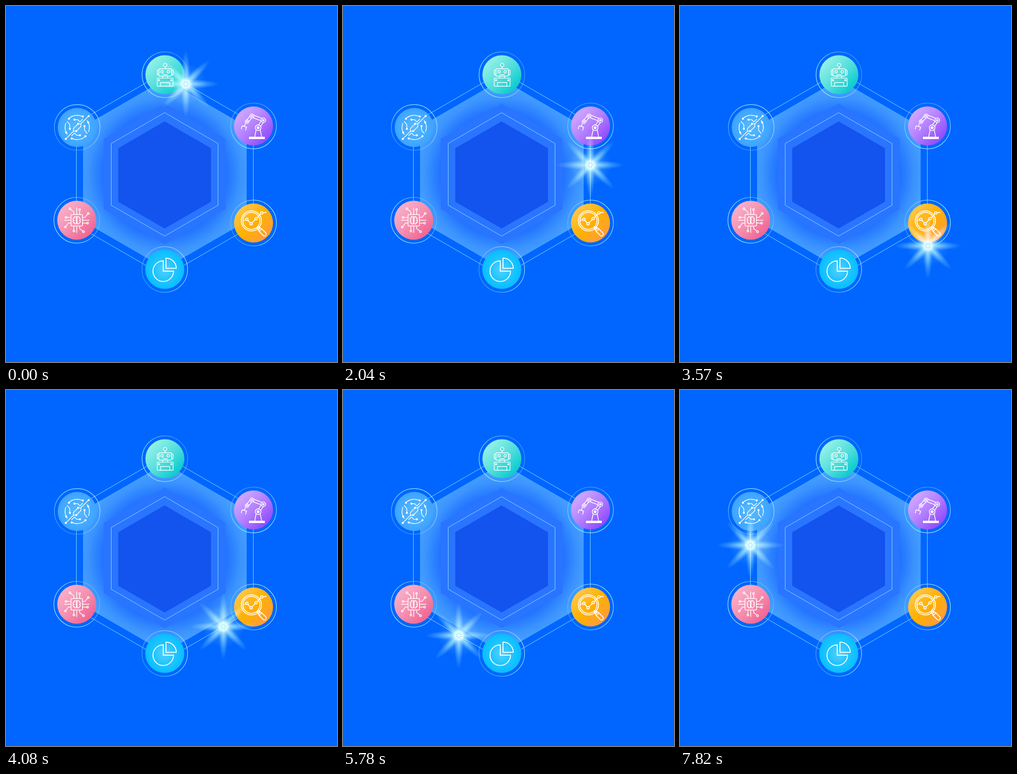
An HTML page with a canvas for the animation above (7990 ms loop, 722 px wide and 776 px high).

```html
<!DOCTYPE html>
<html lang="en">
<head>
<meta charset="utf-8">
<title>Orbiting spark</title>
<style>
html, body { margin: 0; width: 100%; height: 100%; overflow: hidden; background: #0066ff; }
canvas { display: block; }
</style>
</head>
<body>
<canvas id="stage" width="722" height="776"></canvas>
<script>
const W = 722, H = 776, STEP = 170, LOOP = 7990;
const TAU = Math.PI * 2, RAD = Math.PI / 180;
const DISC = 42.5, RING = 49.8;
const view = document.getElementById('stage').getContext('2d');
const scene = document.createElement('canvas');
scene.width = W;
scene.height = H;
const c = scene.getContext('2d');

// Clockwise from the top; the spark reaches a ring at step "enter" and quits it at "leave".
const badges = [
  { x: 346.6, y: 149.8, leave: 0, icon: robot, pen: 1.4, tilt: 160, colors: ['#96f1e8', '#55dfdd', '#08cace'] },
  { x: 540, y: 261.5, enter: 4.05, leave: 10.8, icon: robotArm, pen: 1.6, tilt: 70, colors: ['#cfa9ff', '#b27fff', '#8f4aff'] },
  { x: 540, y: 473, enter: 14.6, leave: 23, icon: magnifier, pen: 1.8, tilt: -20, colors: ['#ffc648', '#ffb000', '#ff9d3c'] },
  { x: 346.3, y: 574.3, enter: 27.2, leave: 32.5, icon: pie, pen: 2, tilt: -30, radial: true, colors: ['#56d2ff', '#25c5ff', '#06bfff'] },
  { x: 154.3, y: 467, enter: 36, leave: 43, icon: chip, pen: 1.5, tilt: 150, colors: ['#f9afc9', '#f58fb0', '#ee6593'] },
  { x: 155.3, y: 264.7, enter: 46.9, icon: circuitGlobe, pen: 1.5, tilt: -60, radial: true, colors: ['#58baff', '#4aafff', '#3ea3ff'] }
];

const polar = (x, y, r, a) => [x + r * Math.cos(a), y + r * Math.sin(a)];
const corner = i => polar(346.5, 366.5, 222.8, (i * 60 - 90) * RAD);

// Where the hexagon edge leaving corner i at angle a crosses the ring of badge i.
function crossing(i, a) {
  const b = badges[i], [x, y] = corner(i);
  const wx = x - b.x, wy = y - b.y;
  const along = wx * Math.cos(a) + wy * Math.sin(a);
  return polar(x, y, Math.sqrt(along * along - wx * wx - wy * wy + RING * RING) - along, a);
}
const entry = i => crossing(i, (i * 60 + 150) * RAD);
const exit = i => crossing(i, (i * 60 + 30) * RAD);

function sparkAt(step) {
  const i = badges.findIndex(b => step < (b.leave ?? Infinity));
  const b = badges[i], prev = badges[i - 1];
  const [x1, y1] = entry(i);
  if (step < b.enter) {
    const [x0, y0] = exit(i - 1);
    const k = (step - prev.leave) / (b.enter - prev.leave);
    return [x0 + (x1 - x0) * k, y0 + (y1 - y0) * k];
  }
  const [x2, y2] = exit(i);
  const from = Math.atan2(y1 - b.y, x1 - b.x);
  const sweep = (Math.atan2(y2 - b.y, x2 - b.x) - from + 2 * TAU) % TAU;
  return polar(b.x, b.y, RING, from + sweep * (step - b.enter) / (b.leave - b.enter));
}

function poly(...points) {
  c.beginPath();
  for (let i = 0; i < points.length; i += 2) c.lineTo(points[i], points[i + 1]);
  c.stroke();
}

function ring(x, y, r, a0 = 0, a1 = 360) {
  c.beginPath();
  c.arc(x, y, r, a0 * RAD, a1 * RAD);
  c.stroke();
}

function dot(x, y, r) {
  c.beginPath();
  c.arc(x, y, r, 0, TAU);
  c.fill();
}

function box(x, y, w, h, r) {
  c.beginPath();
  c.roundRect(x, y, w, h, r);
  c.stroke();
}

function hexagon(x, y, r) {
  c.beginPath();
  for (let i = 0; i < 6; i++) c.lineTo(...polar(x, y, r, (i * 60 - 90) * RAD));
  c.closePath();
}

function blend(gradient, colors) {
  colors.forEach((color, i) => gradient.addColorStop(i / (colors.length - 1), color));
  return gradient;
}

// Draws the same part several times, turned about the icon's middle.
function turned(count, draw) {
  for (let i = 0; i < count; i++) {
    draw();
    c.rotate(TAU / count);
  }
}

function mirrored(draw) {
  for (const side of [1, -1]) {
    c.save();
    c.scale(side, 1);
    draw();
    c.restore();
  }
}

// Round joints joined by bars; a bar is two strokes when gap is above zero.
function chain(joints, gap) {
  joints.forEach(([x, y, r], i) => {
    ring(x, y, r);
    if (!i) return;
    const [px, py, pr] = joints[i - 1];
    const a = Math.atan2(y - py, x - px);
    for (const g of gap ? [-gap, gap] : [0]) {
      const start = Math.sqrt(pr * pr - g * g);
      const end = Math.hypot(x - px, y - py) - Math.sqrt(r * r - g * g);
      const [ox, oy] = polar(px, py, g, a + TAU / 4);
      poly(...polar(ox, oy, start, a), ...polar(ox, oy, end, a));
    }
  });
}

function robot() {
  ring(.5, -21, 3.9);
  c.translate(.6, 0);
  poly(0, -17, 0, -13);
  poly(-5, 0, 5, 0);
  box(-13.7, -13, 27.4, 16, 2);
  box(-17.3, 7.3, 34.6, 17.7, 1);
  poly(-10, 25, -10, 17, 10, 17, 10, 25);
  mirrored(() => {
    box(13.7, -10, 3.6, 10.5, 1);
    ring(6.8, -6.5, 2.8);
    poly(5.2, 3, 5.2, 7.3);
    ring(13.4, 12, 1.5);
  });
}

function robotArm() {
  const joints = [[-14.5, -9.2, 3.9], [-3.5, -22, 4.2], [21.3, -12.5, 5], [10, 3.8, 6.2]];
  chain(joints, 2.8);
  for (const [x, y, r] of joints) dot(x, y, r * .5);
  c.fillRect(-10, 23.5, 34.5, 5);
  poly(5.5, 8.5, 2.5, 23.5);
  poly(14.5, 8.5, 17.5, 23.5);
  c.translate(-20, 1);
  c.rotate(17 * RAD);
  poly(0, -6, 0, 0);
  poly(-5, 7, -5, 0, 5, 0, 5, 7);
}

function magnifier() {
  ring(-4.7, -4.7, 22);
  ring(-4.7, -4.7, 18.5);
  chain([[-14.5, -8, 2.7], [-5.5, 1.7, 2.7], [5.5, -9.5, 2.7], [18, -22, 2.7]], 0);
  poly(-23, -5, -17, -7.3);
  poly(21, -22.2, 27.5, -23.5);
  c.translate(9.5, 10);
  c.rotate(45 * RAD);
  box(0, -3, 4, 6, 0);
  box(4, -4, 20, 8, 3.5);
  poly(8, -4, 8, 4);
}

function quadrant(x, y, a0, a1) {
  c.beginPath();
  c.moveTo(x, y);
  c.arc(x, y, 22.4, a0 * RAD, a1 * RAD);
  c.closePath();
  c.stroke();
}

function pie() {
  quadrant(-3.3, 3.7, 0, 270);
  quadrant(2.7, -2.5, -90, 0);
}

function chip() {
  box(-12.5, -12.5, 25, 25, 2);
  turned(4, () => {
    poly(0, -13, 0, -27);
    poly(6.2, -13, 6.2, -21.5);
    ring(6.2, -23.5, 1.9);
    poly(-6.2, -13, -6.2, -18, -13.3, -23.7);
    ring(-14.8, -25, 1.9);
  });
  mirrored(() => {
    poly(.7, -6, .7, 6);
    ring(3, -5.5, 2.5, 180, 370);
    ring(5.3, -2, 2.7, -80, 80);
    ring(5.3, 2.8, 2.7, -80, 95);
    ring(3, 5.7, 2.5, -10, 180);
  });
}

function circuitGlobe() {
  turned(2, () => {
    ring(0, 0, 26.5, -35, 20);
    ring(0, 0, 26.5, 50, 112);
    poly(-25, 25, -8, 8, -8, 2, 2, -8, 8, -8);
    poly(-6, -17, 1, -17, 6, -12, 12, -18);
    poly(-16, 3, -16, -6, -22, -13);
    for (const [x, y] of [[-25, 25], [-6, -17], [-16, 3], [-24, 11], [2, -8], [12, -24], [-18, -19]]) dot(x, y, 2.2);
  });
}

function drawBadge({ x, y, tilt, colors, radial, icon, pen }) {
  const start = polar(x, y, RING, tilt * RAD), end = polar(x, y, -RING, tilt * RAD);
  c.lineWidth = 1.2;
  c.strokeStyle = blend(c.createLinearGradient(...start, ...end),
    ['rgba(160,240,255,1)', 'rgba(140,225,255,.85)', 'rgba(120,205,255,.55)']);
  ring(x, y, RING);
  const d = DISC * .72;
  c.fillStyle = blend(radial ? c.createRadialGradient(x, y, 0, x, y, DISC)
    : c.createLinearGradient(x - d, y - d, x + d, y + d), colors);
  dot(x, y, DISC);

  c.save();
  c.translate(x, y);
  c.strokeStyle = c.fillStyle = '#fff';
  c.lineJoin = c.lineCap = 'round';
  c.lineWidth = pen;
  icon();
  c.restore();
}

function drawScene() {
  c.fillStyle = '#0066ff';
  c.fillRect(0, 0, W, H);
  c.fillStyle = blend(c.createRadialGradient(346.5, 366, 125, 346.5, 366, 206),
    ['#1a6cfd', '#2a7eff', '#3b93ff', '#459fff', '#4ba6ff']);
  hexagon(346.5, 366, 206);
  c.fill();
  c.fillStyle = '#2a75ff';
  hexagon(346, 366, 153.3);
  c.fill();
  c.fillStyle = '#1353ee';
  hexagon(346, 368.3, 116.8);
  c.fill();
  c.strokeStyle = '#8be0ff';
  c.lineWidth = 1;
  hexagon(346, 367, 134.5);
  c.stroke();
  hexagon(346.5, 366.5, 222.8);
  c.stroke();
  badges.forEach(drawBadge);
}

function flare(rx, ry, turn, alphas) {
  view.save();
  view.rotate(turn);
  view.scale(rx, ry);
  view.fillStyle = blend(view.createRadialGradient(0, 0, 0, 0, 0, 1),
    alphas.map(a => `rgba(170,240,255,${a})`));
  view.beginPath();
  view.arc(0, 0, 1, 0, TAU);
  view.fill();
  view.restore();
}

function spark(x, y) {
  view.save();
  view.translate(x, y);
  view.globalCompositeOperation = 'screen';
  flare(46, 46, 0, [.55, .28, .1, 0]);
  for (let i = 0; i < 4; i++) flare(73, 10.5, i * TAU / 8, [.9, .6, .26, 0]);
  flare(14, 14, 0, [.9, .6, 0]);
  view.globalCompositeOperation = 'source-over';
  view.strokeStyle = 'rgba(20,205,240,.8)';
  view.lineWidth = .9;
  view.beginPath();
  for (let i = 0; i < 8; i++) {
    const a = (i + .5) * TAU / 8;
    view.moveTo(...polar(0, 0, 2.5, a));
    view.lineTo(...polar(0, 0, 7, a));
  }
  view.stroke();
  view.restore();
}

function render(now) {
  view.drawImage(scene, 0, 0);
  spark(...sparkAt(Math.floor((now % LOOP) / STEP)));
}

drawScene();
let start;
function tick(now) {
  start ??= now;
  render(now - start);
  requestAnimationFrame(tick);
}
render(0);
requestAnimationFrame(tick);
</script>
</body>
</html>
```
